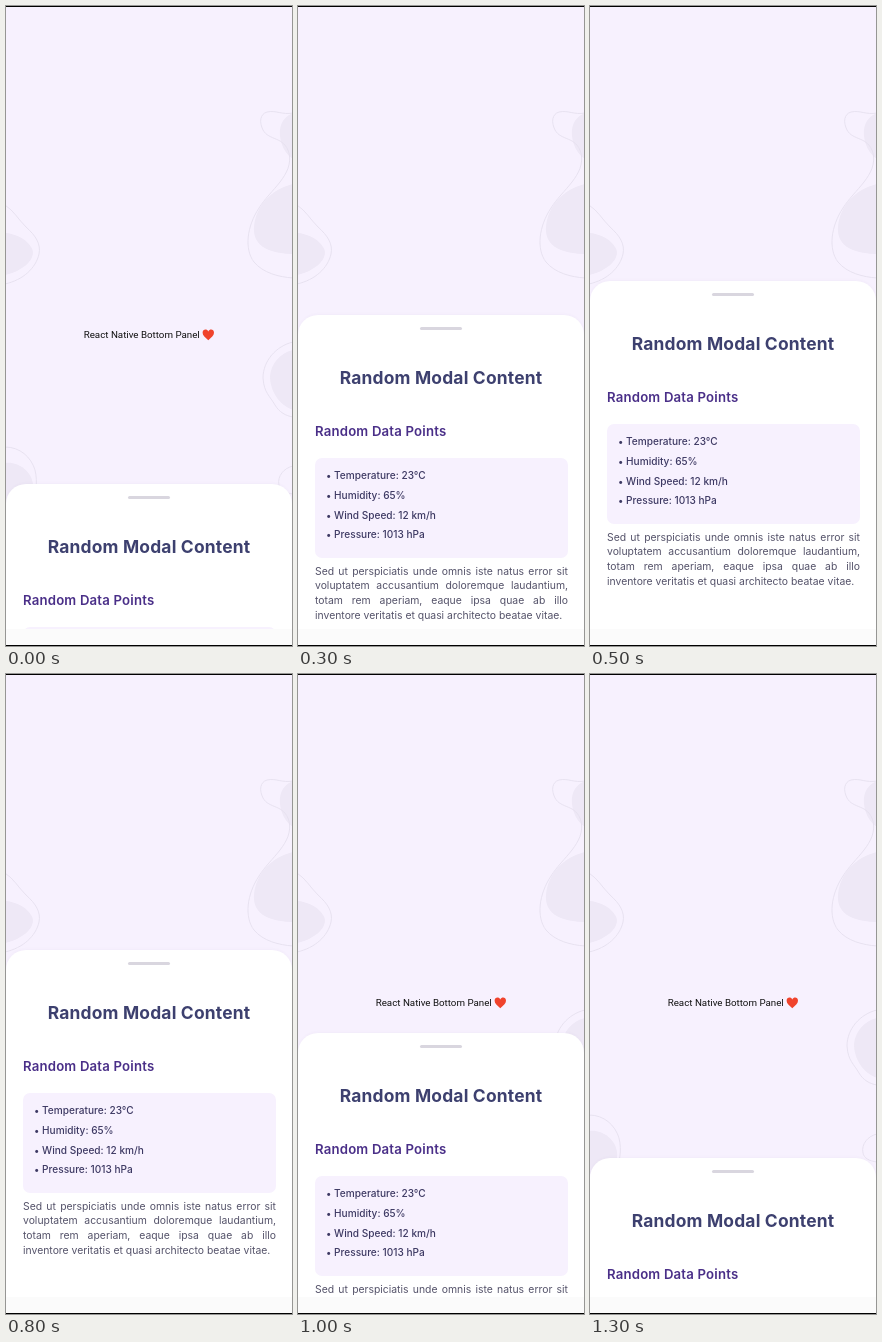
Recreate the animation shown at these times as an HTML page. Size 286 px wide and 640 px high, loop 1400 ms.

```html
<!DOCTYPE html>
<html lang="en">
<head>
<meta charset="utf-8">
<title>Bottom panel</title>
<style>
html, body { margin: 0; width: 100%; height: 100%; overflow: hidden; background: #f7f1fe; }
#stage { position: relative; width: 286px; height: 640px; overflow: hidden; background: #f7f1fe; }
#stage * { position: absolute; white-space: nowrap; }
#back { left: 0; top: 0; }
.fill { fill: #eee8f6; }
.line { fill: none; stroke: #e6e0ef; stroke-width: .9; }
#clip { left: 0; top: 0; width: 286px; height: 623px; overflow: hidden; }
#panel {
  top: 275px; width: 286px; height: 365px; border-radius: 20px 20px 0 0;
  background: #fff; box-shadow: 0 -1px 3px #50308008;
  font-family: Inter, "Open Sans", sans-serif;
}
#handle { left: 122px; top: 12px; width: 42px; height: 3px; border-radius: 2px; background: #d9d6df; }
#title { top: 50px; width: 286px; text-align: center; font: 700 17.4px/26px Inter, sans-serif; letter-spacing: .2px; color: #3d406f; }
#sub { left: 17px; top: 106px; font: 600 13.2px/20px Inter, sans-serif; letter-spacing: .18px; color: #4a2f88; }
#card { left: 17px; top: 143px; width: 253px; height: 100px; border-radius: 7px; background: #f7f1fe; }
.item { left: 28px; font-size: 10.1px; font-weight: 500; line-height: 20px; color: #3d3963; }
.para { left: 17px; width: 253px; font-size: 10.4px; line-height: 15px; color: #55536a; text-align-last: justify; }
.para:last-child { text-align-last: left; }
#nav { top: 623px; width: 286px; height: 17px; background: #fbfbfb; }
.edge { width: 286px; height: 1px; background: #000; }
</style>
</head>
<body>
<div id="stage">
  <svg id="back" width="286" height="640">
    <path class="fill" d="M287 107C277 111 273 119 274 130C275 141 281 149 287 153ZM287 178C270 182 254 194 249 214C245 232 251 247 287 248Z"/>
    <path class="line" d="M287 107C276 109 270 104 261 106C254 108 253 116 257 124C263 135 278 130 283 147C288 169 264 184 253 202C241 220 238 243 248 256C257 267 273 271 287 272"/>
    <path class="fill" d="M-1 227C12 228 25 236 27 246C27 257 13 266 -1 269Z"/>
    <path class="line" d="M-1 199C8 205 12 213 20 221C30 230 35 238 33 248C30 262 17 274 -1 278"/>
    <path class="fill" d="M287 344C274 347 265 358 264 370C264 385 273 399 287 404Z"/>
    <path class="line" d="M287 336C270 340 257 355 257 372C258 387 264 390 269 399C273 406 280 410 287 411"/>
    <path class="fill" d="M-1 457C11 455 25 464 27 478C28 487 24 495 18 500H-1Z"/>
    <path class="line" d="M-1 441C14 441 25 451 29 464C32 477 30 488 24 500M287 460C278 462 271 470 273 479C274 484 279 487 287 488"/>
    <text x="77.7" y="332" font-family="Roboto, sans-serif" font-size="9.75" fill="#111">React Native Bottom Panel</text>
    <path fill="#f0432c" d="M202.3 334.3C199.3 331.6 196.6 329.5 196.6 326.8C196.6 323.1 200.8 322.6 202.3 325.4C203.8 322.6 208 323.1 208 326.8C208 329.5 205.3 331.6 202.3 334.3Z"/>
  </svg>
  <div id="clip">
    <div id="panel">
      <div id="handle"></div>
      <div id="title">Random Modal Content</div>
      <div id="sub">Random Data Points</div>
      <div id="card"></div>
    </div>
  </div>
  <div id="nav"></div>
  <div class="edge" style="top:0"></div>
  <div class="edge" style="top:639px"></div>
</div>
<script>
const LOOP = 1400, STEP = 100, DURATION = 500, TRAVEL = 209;
const OPEN_AT = -58, CLOSE_AT = 776;
const panel = document.getElementById('panel');

function addLines(cls, lines, top, gap) {
  lines.forEach((text, i) => {
    const el = document.createElement('div');
    el.className = cls;
    el.textContent = text;
    el.style.top = top + i * gap + 'px';
    panel.append(el);
  });
}
addLines('item', ['• Temperature: 23°C', '• Humidity: 65%', '• Wind Speed: 12 km/h', '• Pressure: 1013 hPa'], 150, 19.8);
addLines('para', [
  'Sed ut perspiciatis unde omnis iste natus error sit',
  'voluptatem accusantium doloremque laudantium,',
  'totam rem aperiam, eaque ipsa quae ab illo',
  'inventore veritatis et quasi architecto beatae vitae.'
], 248.7, 14.7);

// Quadratic ease in and out, from 0 to 1
function ease(time, start) {
  const p = Math.min(1, Math.max(0, (time - start) / DURATION));
  return p < .5 ? 2 * p * p : 1 - 2 * (1 - p) ** 2;
}

const begin = performance.now();
function draw() {
  const elapsed = (performance.now() - begin) % LOOP;
  const t = Math.floor(elapsed / STEP) * STEP;
  const y = TRAVEL * (1 - ease(t, OPEN_AT) + ease(t, CLOSE_AT));
  panel.style.transform = `translateY(${Math.round(y)}px)`;
  requestAnimationFrame(draw);
}
draw();
</script>
</body>
</html>
```
